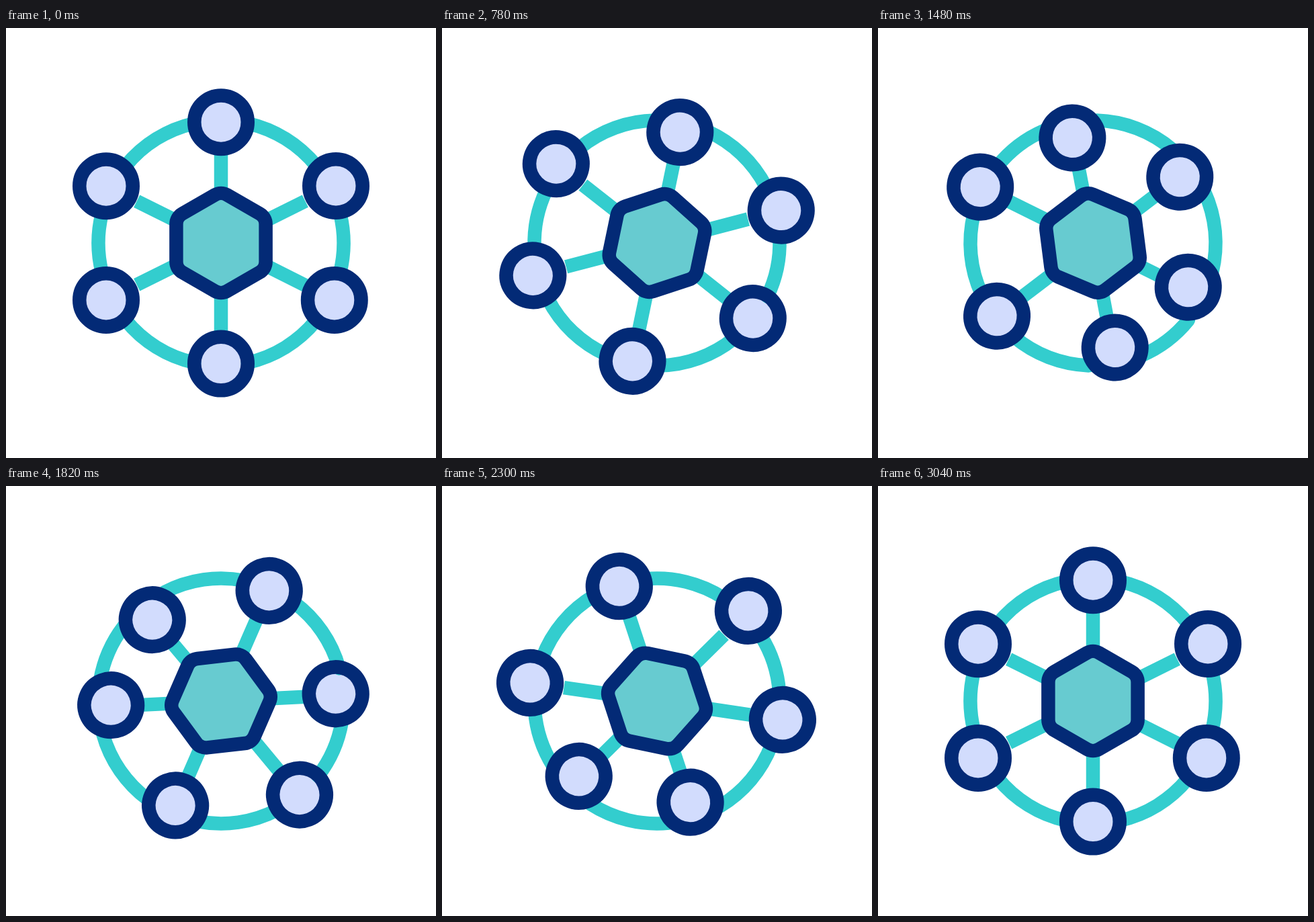
Write an HTML page with a canvas that moves like this. It is 640 by 640 pixels and loops after 3600 ms.

```html
<!DOCTYPE html>
<html lang="en">
<head>
<meta charset="utf-8">
<title>Network hub</title>
<style>
  html, body { margin: 0; width: 100%; height: 100%; overflow: hidden; background: #fff; }
  canvas { display: block; width: 640px; height: 640px; }
</style>
</head>
<body>
<canvas id="stage" width="640" height="640"></canvas>
<script>
const ctx = document.getElementById('stage').getContext('2d');
const LOOP = 3600, LINE = 20.5, RING = 182.5, CAP_GAP = 0.22;
const NAVY = '#032a76', CYAN = '#33cdce', TEAL = '#67cbd0', PALE = '#d2dcfd';

// Keys are [time, value, slope]; slope defaults to a full stop.
const SWING = [[433, 0], [1590, 54.1], [1820, 23.7, -0.11], [2255, -18.4], [3040, 0]];

// Clockwise from the top: rest offset, inward shift, and times of the pulse.
const nodes = [
  { x: 0,    y: -179.8, dx: 0,    dy: 28.5,  pulse: [477, 1181, 1181, 1885] },
  { x: 171,  y: -85,    dx: -33,  dy: 12,    pulse: [790, 1500, 1500, 2210] },
  { x: 168.8, y: 84.9,  dx: -30,  dy: -20,   pulse: [567, 1297, 1297, 2025] },
  { x: 0,    y: 179.6,  dx: 0,    dy: -22.3, pulse: [1493, 2198, 2198, 2903] },
  { x: -171, y: 84.9,   dx: 32.5, dy: -19,   pulse: [1340, 2080, 2080, 2820] },
  { x: -171, y: -84.8,  dx: 32.4, dy: 16.8,  pulse: [930, 1650, 1730, 2180] }
];
for (const n of nodes) {
  n.angle = Math.atan2(n.y, n.x);
  n.keys = n.pulse.map((t, i) => [t, i === 1 || i === 2 ? 1 : 0]);
}

function valueAt(keys, t) {
  if (t <= keys[0][0]) return keys[0][1];
  for (let i = 1; i < keys.length; i++) {
    const [t0, v0, s0 = 0] = keys[i - 1];
    const [t1, v1, s1 = 0] = keys[i];
    if (t < t1) {
      const d = t1 - t0, u = (t - t0) / d, w = 1 - u;
      const e = u * u * (3 - 2 * u);
      return v0 + (v1 - v0) * e + d * u * w * (s0 * w - s1 * u);
    }
  }
  return keys[keys.length - 1][1];
}

function stroke(color) {
  ctx.strokeStyle = color;
  ctx.stroke();
}

function disc(x, y, r) {
  ctx.beginPath();
  ctx.arc(x, y, r, 0, Math.PI * 2);
}

function hexagon(apothem, round) {
  const r = apothem / Math.cos(Math.PI / 6);
  const corner = i => [r * Math.sin(i * Math.PI / 3), -r * Math.cos(i * Math.PI / 3)];
  ctx.beginPath();
  ctx.moveTo(apothem, 0);
  for (let i = 2; i < 8; i++) ctx.arcTo(...corner(i), ...corner(i + 1), round);
  ctx.closePath();
}

function draw(t) {
  ctx.setTransform(1, 0, 0, 1, 0, 0);
  ctx.fillStyle = '#fff';
  ctx.fillRect(0, 0, 640, 640);
  ctx.translate(320, 320);
  ctx.rotate(valueAt(SWING, t) * Math.PI / 180);
  ctx.lineWidth = LINE;

  const placed = nodes.map(n => {
    const k = valueAt(n.keys, t);
    return [n.x + n.dx * k, n.y + n.dy * k];
  });

  // Spokes
  ctx.lineCap = 'butt';
  for (const n of nodes) {
    ctx.beginPath();
    ctx.moveTo(0, 0);
    ctx.lineTo(140 * Math.cos(n.angle), 140 * Math.sin(n.angle));
    stroke(CYAN);
  }

  ctx.fillStyle = PALE;
  for (const [x, y] of placed) {
    disc(x, y, 39.75);
    ctx.fill();
  }

  // Outer ring, broken at each node's resting place
  ctx.lineCap = 'round';
  nodes.forEach((n, i) => {
    const next = nodes[(i + 1) % nodes.length];
    ctx.beginPath();
    ctx.arc(0, 0, RING, n.angle + CAP_GAP, next.angle - CAP_GAP);
    stroke(CYAN);
  });

  for (const [x, y] of placed) {
    disc(x, y, 39.75);
    stroke(NAVY);
  }

  hexagon(66.6, 18);
  ctx.fillStyle = TEAL;
  ctx.fill();
  stroke(NAVY);
}

function tick() {
  draw(performance.now() % LOOP);
  requestAnimationFrame(tick);
}
tick();
</script>
</body>
</html>
```
